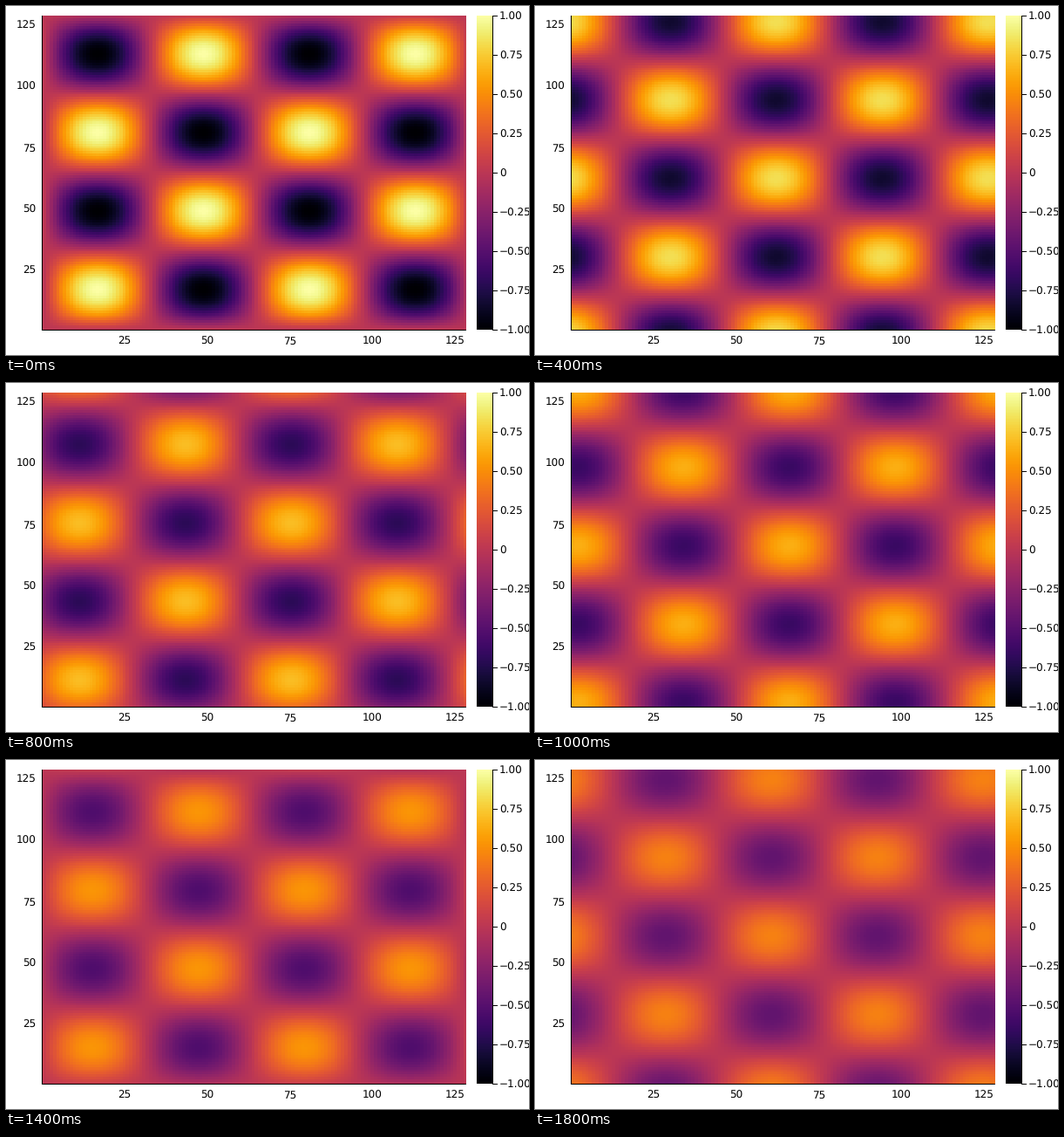
Animation of 600 by 400 pixels, one loop 2 s. Source, as a matplotlib script:

```python
import numpy as np
import matplotlib.pyplot as plt
from matplotlib.animation import FuncAnimation

W, H, DPI = 600, 400, 100
PX = 72 / DPI  # points per pixel
N = 128
LEFT, RIGHT, TOP, BOTTOM = 42, 528, 11, 371
BAR_LEFT, BAR_RIGHT = 540, 558
FRAMES, INTERVAL = 10, 200
SHIFT = 9.36   # cells travelled per step
DECAY = 0.09   # exponential damping per step

plt.rcParams["text.hinting"] = "none"
fig = plt.figure(figsize=(W / DPI, H / DPI), dpi=DPI, facecolor="white")
ax = fig.add_axes([0, 0, 1, 1])
ax.set_xlim(0, W)
ax.set_ylim(H, 0)
ax.axis("off")


def cells(count, size):
    """Index of the cell shown by each of size pixels."""
    return np.arange(size) * count // size


COLS = cells(N, RIGHT - LEFT)
ROWS = N - 1 - cells(N, BOTTOM - TOP)  # from the top down


def vorticity(step):
    wave = np.sin(2 * np.pi * (np.arange(N) + SHIFT * step) / 64)
    return np.exp(-DECAY * step) * np.outer(wave[ROWS], wave[COLS])


def image(data, left):
    return fig.figimage(data, left, H - BOTTOM, origin="upper",
                        cmap="inferno", vmin=-1, vmax=1)


def line(xs, ys):
    ax.plot(xs, ys, color="black", lw=PX, solid_capstyle="butt", snap=False)


def label(x, y, text, ha):
    ax.text(x, y, text, ha=ha, va="baseline", fontsize=12 * PX,
            family="DejaVu Sans", color="black")


field = image(vorticity(0), LEFT)
shades = np.linspace(1, -1, 256)[cells(256, BOTTOM - TOP)]
image(np.tile(shades[:, None], BAR_RIGHT - BAR_LEFT), BAR_LEFT)

# plot axes
line([LEFT - 0.5] * 2, [TOP, BOTTOM + 1])
line([LEFT - 1, RIGHT], [BOTTOM + 0.5] * 2)
for tick in range(25, 126, 25):
    part = (tick - 0.5) / N
    label(LEFT + part * (RIGHT - LEFT) + 0.3, 387.4, str(tick), "center")
    label(34.5, BOTTOM - part * (BOTTOM - TOP) + 4.9, str(tick), "right")

# colour bar axis
line([BAR_RIGHT + 0.5] * 2, [TOP, BOTTOM + 1])
for value in np.linspace(-1, 1, 9):
    y = 191.5 - 180 * value
    line([BAR_RIGHT, 564], [y, y])
    text = f"{value:.2f}".replace("-", "\u2212") if value else "0"
    label(566, y + 3.9, text, "left")


def update(step):
    field.set_data(vorticity(step))
    return [field]


anim = FuncAnimation(fig, update, frames=FRAMES, interval=INTERVAL,
                     repeat=True, repeat_delay=0)
plt.show()
```
